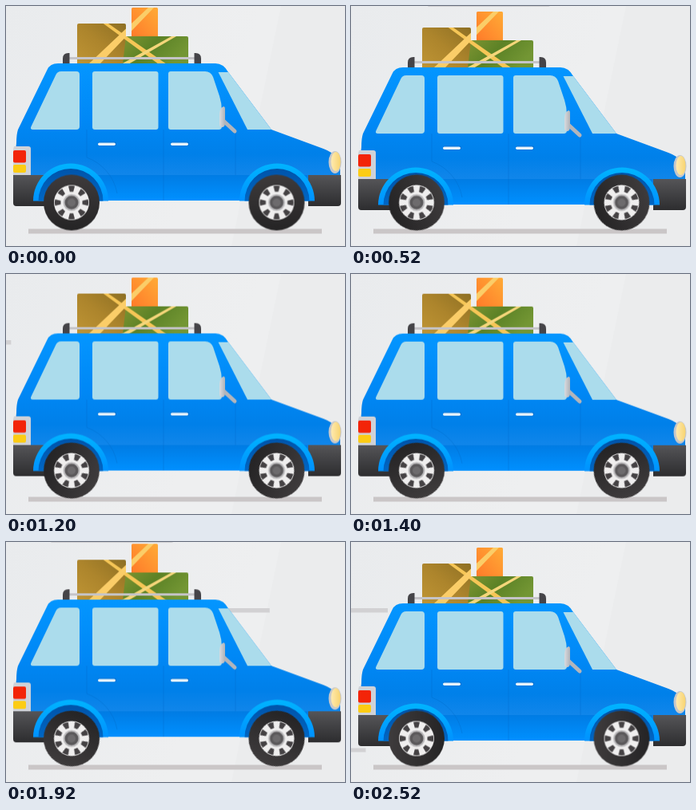
These frames come from a looping animation (424 px wide and 301 px high, 2.56 s). An HTML page:

```html
<!DOCTYPE html>
<html lang="en">
<head>
<meta charset="utf-8">
<title>Family car on the road</title>
<style>
  html, body { margin: 0; width: 100%; height: 100%; overflow: hidden; background: #ebecee; }
  svg { display: block; width: 100%; height: 100%; }

  .lines { fill: #d2d1d3; animation: drive 2560ms steps(64) infinite; }
  .car { animation: bounce 2560ms ease-in-out infinite; }
  .spin { animation: spin 2560ms steps(64) infinite; }

  @keyframes drive { to { transform: translateX(-2587px); } }
  @keyframes spin { to { transform: rotate(1440deg); } }
  /* a two-second bounce, cut off in its second round */
  @keyframes bounce {
    0% { transform: translateY(0); }
    20.3125% { transform: translateY(5px); }
    35.9375% { transform: translateY(1.7px); }
    46.875% { transform: translateY(2.5px); }
    64.0625% { transform: translateY(3px); }
    78.125% { transform: translateY(0); }
    98.4375%, 100% { transform: translateY(5px); }
  }
</style>
</head>
<body>
<svg viewBox="0 0 424 301" preserveAspectRatio="none">
  <defs>
    <linearGradient id="sky" x2="1" y2=".3">
      <stop stop-color="#e9ebed"/><stop offset=".7" stop-color="#eeeff0"/>
    </linearGradient>
    <linearGradient id="paint" x2="0" y2="1">
      <stop stop-color="#0496ff"/><stop offset=".5" stop-color="#0088f6"/><stop offset=".8" stop-color="#0080e9"/><stop offset="1" stop-color="#1286ea"/>
    </linearGradient>
    <linearGradient id="sill" x2="0" y2="1">
      <stop stop-color="#007ce4"/><stop offset="1" stop-color="#0090ff"/>
    </linearGradient>
    <linearGradient id="glow" x2="0" y2="1">
      <stop stop-color="#00b4ff"/><stop offset="1" stop-color="#0092ff"/>
    </linearGradient>
    <linearGradient id="well" x2="0" y2="1">
      <stop stop-color="#0054aa"/><stop offset="1" stop-color="#0066c4"/>
    </linearGradient>
    <linearGradient id="bumper" x2="0" y2="1">
      <stop stop-color="#555558"/><stop offset="1" stop-color="#2d2d2f"/>
    </linearGradient>
    <linearGradient id="tyre" x2="0" y2="1">
      <stop stop-color="#3e3b3c"/><stop offset="1" stop-color="#252425"/>
    </linearGradient>
    <linearGradient id="tan" y1="1" x2="1" y2="0">
      <stop stop-color="#bf9535"/><stop offset=".5" stop-color="#ad852c"/><stop offset="1" stop-color="#8e7024"/>
    </linearGradient>
    <linearGradient id="orange" y1="1" x2="1" y2="0">
      <stop stop-color="#ff7829"/><stop offset="1" stop-color="#ffab36"/>
    </linearGradient>
    <linearGradient id="green" x2="1" y2=".4">
      <stop stop-color="#7f9432"/><stop offset=".5" stop-color="#5c8226"/><stop offset="1" stop-color="#739634"/>
    </linearGradient>
    <linearGradient id="lamp">
      <stop stop-color="#ffeab0"/><stop offset="1" stop-color="#f8d470"/>
    </linearGradient>
    <linearGradient id="chrome">
      <stop stop-color="#d9dbdf"/><stop offset="1" stop-color="#b0b3b9"/>
    </linearGradient>
    <clipPath id="bags">
      <path d="M89 22H150V38H157V2H190V38H228V73H89Z"/>
    </clipPath>
    <path id="slot" d="M-4-20.500Q0-22 4-20.500L2.200-13.500H-2.200Z"/>
    <g id="slots">
      <use href="#slot"/><use href="#slot" transform="rotate(90)"/>
      <use href="#slot" transform="rotate(180)"/><use href="#slot" transform="rotate(270)"/>
    </g>
    <g id="wheel">
      <g class="spin">
        <circle r="35" fill="url(#tyre)"/>
        <circle r="22" fill="#efeeee"/>
        <g fill="#454244"><use href="#slots"/><use href="#slots" transform="rotate(45)"/></g>
      </g>
      <circle r="10.500" fill="#b9b8ba"/>
      <circle r="8.500" fill="#5b595b"/>
      <circle r="5" fill="#6d6b6d"/>
    </g>
    <g id="arch">
      <path d="M-47 0A47 47 0 0 1 47 0Z" fill="url(#glow)"/>
      <path d="M-40.500 0A40.500 40.500 0 0 1 40.500 0Z" fill="url(#well)"/>
    </g>
    <g id="handle">
      <rect width="23" height="5" rx="2" fill="#0070d2"/>
      <rect y="1" width="22" height="3.500" rx="1.700" fill="#e8f4fc"/>
    </g>
  </defs>

  <rect width="424" height="301" fill="url(#sky)"/>
  <path d="M344 0H424V301H282Z" fill="#ebeced"/>

  <g class="lines">
    <rect x="621.6" y="-4" width="152" height="5"/>
    <rect x="1996.6" y="-4" width="152" height="5"/>
    <rect x="1067" y="83" width="152" height="5.5"/>
    <rect x="2118" y="83" width="152" height="5.5"/>
    <rect x="2441" y="83" width="152" height="5.5"/>
    <rect x="2472" y="258.500" width="93" height="5"/>
  </g>

  <rect x="28" y="279.500" width="367" height="6" fill="#cac6c7"/>

  <g class="car">
    <rect x="89" y="22" width="61" height="52" rx="2" fill="url(#tan)"/>
    <rect x="157" y="2" width="33" height="40" rx="1.500" fill="url(#orange)"/>
    <path d="M150 38H226Q228 38 228 40V73H146Z" fill="url(#green)"/>
    <g clip-path="url(#bags)">
      <path d="M119 20H125L201 73H191Z" fill="#f6c656"/>
      <path d="M178 2H185L117 73H103Z" fill="#fbcd68"/>
      <path d="M207 38H213L153 73H144Z" fill="#f4d67a"/>
    </g>

    <path d="M75 65.500H240" stroke="#c5c4c8" stroke-width="3"/>
    <path id="post" d="M71 73V66Q71 59 78 59H79.500V73Z" fill="#454448"/>
    <use href="#post" transform="translate(315)scale(-1 1)"/>

    <path d="M9 212L13 172Q13 161 15 155L51.500 80Q55 72 65 72H262Q272 72 278 83L332 155L397 179Q418 187 418 204V214H9Z" fill="url(#paint)"/>
    <path d="M36 212H390V244H36Z" fill="url(#sill)"/>
    <path d="M9 212H50V251H13Q9 251 9 247ZM378 212H419V247Q419 251 415 251H378Z" fill="url(#bumper)"/>
    <path d="M101 155V190A59 59 0 0 1 139 235M197 155V244M287 155V212" fill="none" stroke="#0067c4" stroke-width=".8" opacity=".45"/>

    <use href="#arch" x="81" y="244.500"/>
    <use href="#arch" x="339" y="244.500"/>

    <g fill="#abdcec">
      <path d="M69 82H88Q92 82 92 86V151Q92 155 88 155H34Q29 155 32 150L62 87Q64 82 69 82Z"/>
      <rect x="108" y="82" width="82.500" height="73" rx="3"/>
      <path d="M206 82H249Q256 82 259 89L267 113Q270 122 270 132V151Q270 155 266 155H206Q203 155 203 152V85Q203 82 206 82Z"/>
      <path d="M265.500 83H278L332 155H302Z"/>
    </g>

    <path d="M272 144L286 157" stroke="#b3b5bb" stroke-width="5" stroke-linecap="round"/>
    <path d="M272 126Q267 128 267 137V148Q267 152 270 152Q274 152 274 147V129Q274 126 272 126Z" fill="url(#chrome)"/>

    <use href="#handle" x="115" y="170.500"/>
    <use href="#handle" x="206" y="170.500"/>

    <path d="M10 176H28Q31 176 31 179V212H9V180Z" fill="#cfd2d8"/>
    <rect x="9" y="181" width="16" height="15.500" rx="2" fill="#f32408"/>
    <rect x="9" y="199" width="16" height="10" rx="2" fill="#fccc14"/>

    <ellipse cx="411.500" cy="196" rx="8" ry="14" fill="#c6c7ca"/>
    <ellipse cx="412.500" cy="195" rx="6" ry="12" fill="url(#lamp)"/>
  </g>

  <use href="#wheel" x="82" y="246.500"/>
  <use href="#wheel" x="338.500" y="246.500"/>
</svg>
</body>
</html>
```
